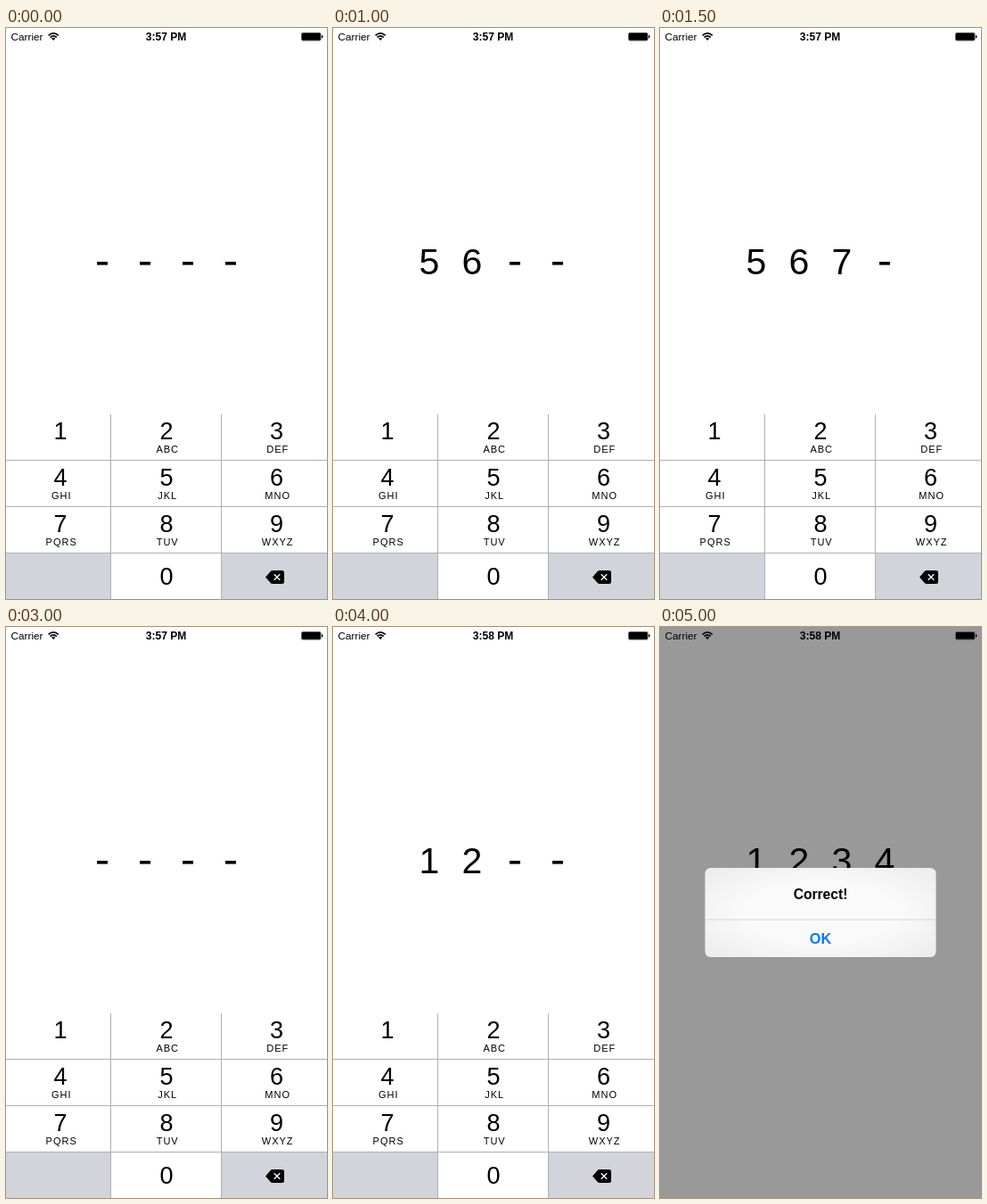
These frames come from a looping animation (360 px wide and 640 px high, 6 s). An HTML page:

```html
<!DOCTYPE html>
<html lang="en">
<head>
<meta charset="utf-8">
<title>Passcode</title>
<style>
html, body { margin: 0; width: 100%; height: 100%; overflow: hidden; background: #fff; }
svg { display: block; width: 360px; height: 640px; font-family: "Liberation Sans", Arial, sans-serif; }
.mid text { text-anchor: middle; }
.code { font-size: 41px; }
.digit { font-size: 27px; }
.letters { font-size: 11px; letter-spacing: 1px; }
.bold { font-weight: bold; }
</style>
</head>
<body>
<svg viewBox="0 0 360 640">
  <defs>
    <radialGradient id="glass" cx=".5" cy=".5" r=".72">
      <stop offset=".45" stop-color="#fafafa"/>
      <stop offset="1" stop-color="#ebebeb"/>
    </radialGradient>
  </defs>
  <rect id="back" width="360" height="640"/>

  <text x="5.5" y="14" font-size="11.8">Carrier</text>
  <g fill="none" stroke="#000" stroke-width="1.7">
    <path d="M47.6 8.4Q53.2 3.2 58.8 8.4M49.6 10.5Q53.2 7.2 56.8 10.5"/>
    <path d="M51.1 11.7Q53.2 10 55.3 11.7L53.2 13.9Z" fill="#000" stroke="none"/>
  </g>
  <g class="mid"><text id="clock" class="bold" x="179.5" y="14" font-size="12"></text></g>
  <rect x="331.5" y="5.5" width="21.5" height="8.5" rx="1.5" stroke="#555"/>
  <path d="M354 8q1.5 0 1.5 1.8t-1.5 1.8z"/>

  <g id="code" class="mid code"></g>

  <g id="pad" class="mid">
    <path d="M0 589H117.5V640H0ZM242 589H360V640H242Z" fill="#d1d4db"/>
    <path d="M117.5 433V640M241.5 433V640M0 484.5H360M0 536.5H360M0 588.5H360" stroke="#b0b0b0"/>
    <path d="M291 615.5L296.5 609.2Q297.5 608 299 608H309.5Q312 608 312 610.5V620.5Q312 623 309.5 623H299Q297.5 623 296.5 621.8Z"/>
    <path d="M300.7 612.2l6.6 6.6m0-6.6l-6.6 6.6" stroke="#fff" stroke-width="1.3"/>
  </g>

  <g id="alert" class="mid bold">
    <rect x="50.5" y="270" width="259" height="100" rx="6" fill="url(#glass)"/>
    <path d="M50.5 328H309.5" stroke="#d6d6d6"/>
    <text id="message" x="180" y="305" font-size="15.6"></text>
    <text x="180" y="355" font-size="16.2" fill="#007aff">OK</text>
  </g>
</svg>
<script>
const $ = id => document.getElementById(id);

function add(parent, tag, attrs, text = "") {
  const el = document.createElementNS("http://www.w3.org/2000/svg", tag);
  for (const key in attrs) el.setAttribute(key, attrs[key]);
  el.textContent = text;
  return parent.appendChild(el);
}

const columns = [61, 180, 303.5];
const letters = ["", "ABC", "DEF", "GHI", "JKL", "MNO", "PQRS", "TUV", "WXYZ"];
letters.forEach((label, i) => {
  const x = columns[i % 3], y = 461 + 52 * Math.floor(i / 3);
  add($("pad"), "text", { x, y, class: "digit" }, i + 1);
  add($("pad"), "text", { x: x + 1.2, y: y + 15, class: "letters" }, label);
});
add($("pad"), "text", { x: 180, y: 624, class: "digit" }, 0);

const slots = [108, 156, 204, 252].map(x => ({
  dash: add($("code"), "rect", { x: x - 6, y: 262, width: 12, height: 3.6 }),
  digit: add($("code"), "text", { x, y: 276 })
}));

const show = (el, on) => { el.style.display = on ? "" : "none"; };

function draw(t) {
  const second = t >= 3000;
  const typed = Math.min(4, Math.floor(t % 3000 / 500));
  const done = typed === 4;

  slots.forEach(({ dash, digit }, i) => {
    show(dash, i >= typed);
    digit.textContent = i < typed ? (second ? "1234" : "5678")[i] : "";
  });
  $("clock").textContent = done || (second && typed) ? "3:58 PM" : "3:57 PM";
  $("back").setAttribute("fill", done ? "#999" : "#fff");
  $("message").textContent = second ? "Correct!" : "Wrong!";
  show($("pad"), !done);
  show($("alert"), done);
}

const start = performance.now();
function tick() {
  draw((performance.now() - start) % 6000);
  requestAnimationFrame(tick);
}
tick();
</script>
</body>
</html>
```
